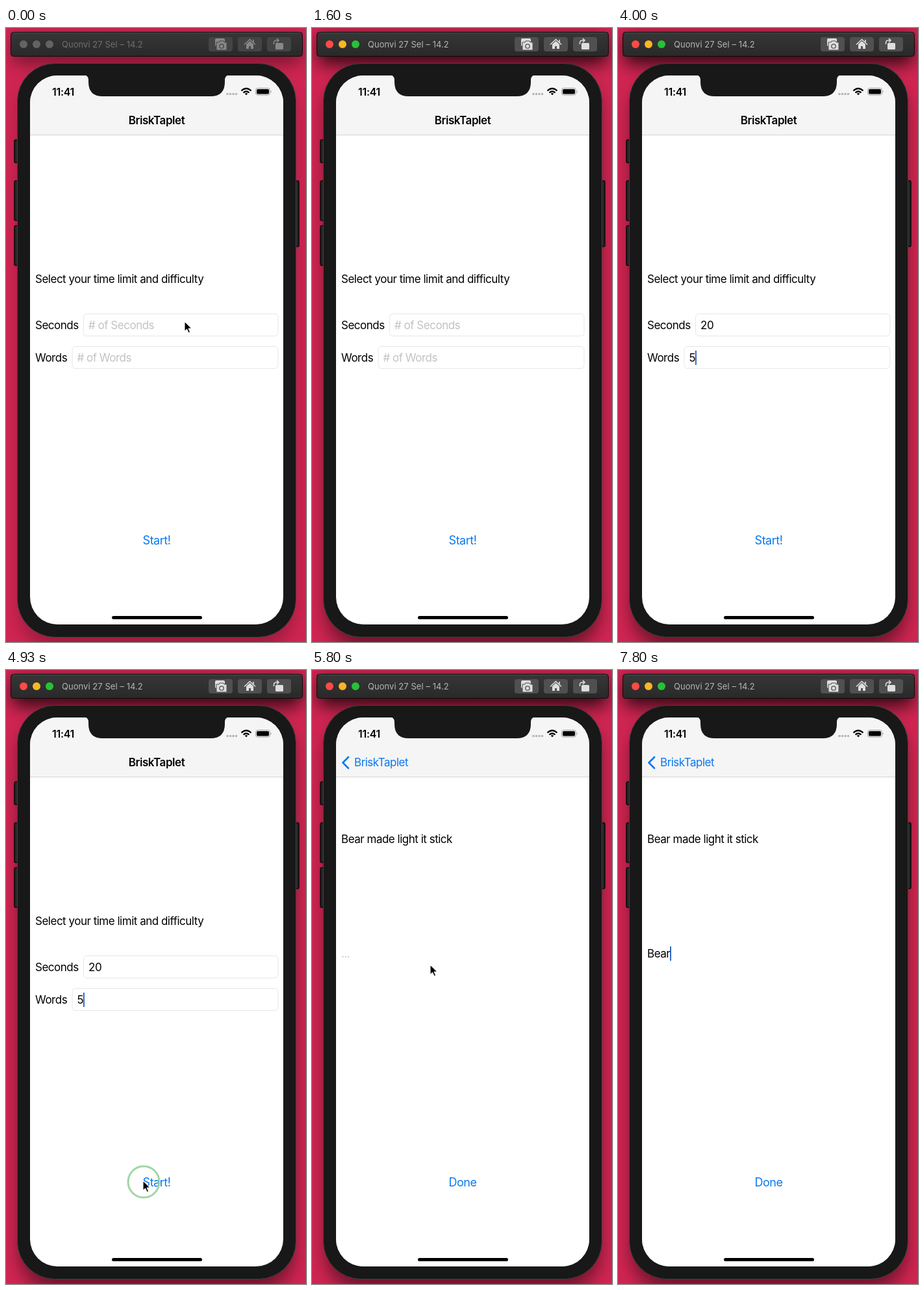
An HTML page that plays this animation: 462 by 944 pixels, repeating every 8000 ms.

```html
<!DOCTYPE html>
<html lang="en">
<head>
<meta charset="utf-8">
<title>Typing game</title>
<style>
html, body { margin: 0; width: 100%; height: 100%; overflow: hidden; background: #d02552; }
svg { display: block; width: 100vw; height: 100vh; }
text { font: 17px Inter, "Liberation Sans", sans-serif; letter-spacing: -.49px; white-space: pre; }
.bold { font-weight: 600; letter-spacing: -.45px; }
.blue { fill: #0a78f0; }
.button { font-size: 18px; text-anchor: middle; }
.hint { fill: #c2c2c4; }
.field { fill: #fff; stroke: #e6e6e6; }
.side { fill: #262626; stroke: #070707; stroke-width: 1.5; }
.icon { fill: none; stroke: currentColor; stroke-width: 1.6; }
#bar { color: #dedede; --key: #505050; --label: #b5b5b5; }
#bar.idle { color: #888; --key: #444; --label: #6f6f6f; }
#bar.idle .light { fill: #636363; }
.key { fill: var(--key); }
#device { font-size: 13px; letter-spacing: .05px; fill: var(--label); }
</style>
</head>
<body>
<svg viewBox="0 0 462 944" preserveAspectRatio="none">
  <defs>
    <linearGradient id="metal" x2="0" y2="1">
      <stop stop-color="#373737"/><stop offset="1" stop-color="#292929"/>
    </linearGradient>
    <filter id="blur" x="-20%" y="-20%" width="140%" height="140%"><feGaussianBlur stdDeviation="13"/></filter>
    <clipPath id="screen"><rect x="37" y="73" width="390" height="844" rx="42"/></clipPath>
    <clipPath id="content"><rect x="37" y="165" width="390" height="752"/></clipPath>
  </defs>

  <rect width="462" height="944" fill="#d02552"/>
  <g id="shadow" filter="url(#blur)">
    <rect x="10" y="14" width="444" height="42" rx="8"/>
    <rect x="20" y="72" width="424" height="884" rx="60" opacity=".6"/>
  </g>

  <g id="bar">
    <rect x="7.5" y="6.5" width="449" height="37" rx="4" fill="url(#metal)" stroke="#0b0b0b"/>
    <path d="M11 7.5H453" stroke="#5a5a5a" opacity=".7"/>
    <circle class="light" cx="27" cy="25" r="6" fill="#ff4b43"/>
    <circle class="light" cx="47" cy="25" r="6" fill="#fdb524"/>
    <circle class="light" cx="67" cy="25" r="6" fill="#27c138"/>
    <text id="device" x="86" y="30">Quonvi 27 Sel – 14.2</text>
    <rect class="key" x="312" y="14" width="37" height="22" rx="4"/>
    <rect class="key" x="357" y="14" width="37" height="22" rx="4"/>
    <rect class="key" x="402" y="14" width="37" height="22" rx="4"/>
    <rect x="322" y="16" width="15" height="12" rx="2" fill="currentColor"/>
    <path d="M324 22h4l1-2h6l1 2h4v12h-16z" fill="currentColor" stroke="var(--key)"/>
    <circle cx="332" cy="28" r="3.2" fill="none" stroke="var(--key)" stroke-width="1.3"/>
    <path class="icon" d="M367 25.5l8.500-8 8.500 8M381 18v4"/>
    <path d="M370 25l5.500-5 5.500 5v7h-4v-4h-3v4h-4z" fill="currentColor"/>
    <rect x="415" y="23" width="12" height="10" rx="1.500" fill="currentColor"/>
    <path class="icon" d="M412.500 25v-2q0-4 4-4h3M417 16l3 3-3 3"/>
  </g>

  <g class="side">
    <rect x="13" y="172" width="9" height="35" rx="2"/>
    <rect x="13" y="235" width="9" height="61" rx="2"/>
    <rect x="13" y="304" width="9" height="61" rx="2"/>
    <rect x="442" y="235" width="9" height="101" rx="2"/>
  </g>
  <rect x="17.500" y="54.500" width="429" height="882" rx="58" fill="#181818" stroke="#404040"/>

  <g clip-path="url(#screen)">
    <rect x="37" y="73" width="390" height="844" fill="#fff"/>
    <g clip-path="url(#content)">
      <g id="setup">
        <text x="45" y="392">Select your time limit and difficulty</text>
        <text x="45" y="463">Seconds</text>
        <rect class="field" x="119.500" y="439.500" width="299.500" height="34" rx="5"/>
        <text id="seconds" x="127" y="463"></text>
        <text x="45" y="513">Words</text>
        <rect class="field" x="102" y="489.500" width="317" height="34" rx="5"/>
        <text id="words" x="109.500" y="513"></text>
        <text class="blue button" x="232" y="794">Start!</text>
      </g>
      <rect id="dim" x="37" y="165" width="390" height="752"/>
      <g id="game">
        <rect x="37" y="165" width="390" height="752" fill="#fff"/>
        <text x="45" y="266">Bear made light it stick</text>
        <text id="entry" x="45" y="442"></text>
        <text class="blue button" x="232" y="794">Done</text>
      </g>
      <rect id="caret" width="2" height="22" fill="#3268c4"/>
    </g>

    <rect x="37" y="73" width="390" height="91" fill="#f5f5f5"/>
    <path d="M37 164.500H427" stroke="#d3d3d3"/>
    <text id="heading" class="bold" x="232" y="148" text-anchor="middle">BriskTaplet</text>
    <path id="chevron" d="M56 134l-8.500 8.500 8.500 8.500" fill="none" stroke="#0a78f0" stroke-width="2.700" stroke-linecap="round" stroke-linejoin="round"/>
    <text id="back" class="blue" y="148">BriskTaplet</text>
    <path d="M120 72q7 1 7 8v3q0 22 22 22h166q22 0 22-22v-3q0-7 7-8z" fill="#181818"/>
    <text class="bold" x="71" y="103.500" style="font-size:16px;letter-spacing:-.3px">11:41</text>
    <g fill="#b5b5b7">
      <circle cx="341" cy="101.500" r="1.800"/><circle cx="345.500" cy="101.500" r="1.800"/>
      <circle cx="350" cy="101.500" r="1.800"/><circle cx="354.500" cy="101.500" r="1.800"/>
    </g>
    <g fill="none" stroke="#000" stroke-width="2.300">
      <path d="M362.500 96.500q7.500-7 15 0M365.500 99.500q4.500-4 9 0"/>
      <path d="M367.800 101q2.200-1.800 4.400 0l-2.200 2.300z" fill="#000" stroke="none"/>
    </g>
    <rect x="384.500" y="92.500" width="22" height="10.500" rx="3" fill="none" stroke="#9b9b9b"/>
    <rect x="386" y="94" width="19" height="7.500" rx="1.700"/>
    <path d="M408 96q2 1.800 0 3.600z" fill="#9b9b9b"/>
    <rect x="163" y="904" width="139" height="5" rx="2.500"/>
  </g>

  <circle id="ring" fill="none" stroke="#9bd4a2" stroke-width="3"/>
  <path id="pointer" d="M0 0v15.500l3.600-3.400 2.500 5.700 2.600-1.100-2.500-5.600h5z" stroke="#fff" stroke-width="1.100" stroke-linejoin="round"/>
</svg>

<script>
const LOOP = 8000, PUSH = 5000, BLUE_BACK_X = 65;
const el = {};
document.querySelectorAll('[id]').forEach(node => el[node.id] = node);

const pointerPath = [
  [0, 275, 451], [870, 240, 453], [4000, 240, 453], [4200, 236, 500],
  [4600, 214, 765], [4800, 211, 785], [PUSH, 211, 785], [5270, 172, 562],
  [5440, 176, 490], [5730, 182, 453]
];
const pointerShown = [[0, 1], [1270, 0], [4000.5, 0], [4060, 1], [7330, 0]];
const clicks = [[400, 258, 452], [930, 240, 453], [4865, 212, 787], [6000, 182, 455]];
const caretFade = [
  [0, 0], [930, 0], [935, 1], [1400, 1], [1595, 0], [1735, 0], [1935, 1],
  [3335, 1], [3530, 0], [3590, 0], [3595, 1], [4130, 1], [4330, 0],
  [4500, 0], [4700, 1], [4995, 1], [5000, 0], [6130, 0], [6135, 1],
  [6760, 1], [6960, 0], [7130, 0], [7325, 1]
];
const caretOwner = [[0, 'seconds'], [3065, 'words'], [5500, 'entry']];
const fields = {
  seconds: { hint: '# of Seconds', typed: [[0, ''], [2525, '2'], [2865, '20']] },
  words: { hint: '# of Words', typed: [[0, ''], [3595, '5']] },
  entry: { hint: '...', typed: [[0, ''], [7530, 'B'], [7595, 'Be'], [7665, 'Bea'], [7790, 'Bear']] }
};

const hold = (table, t) => table.filter(row => row[0] <= t).pop()[1];

function blend(table, t) {
  const next = table.findIndex(row => row[0] > t);
  if (next < 0) return table[table.length - 1].slice(1);
  const a = table[next - 1], b = table[next];
  const k = (t - a[0]) / (b[0] - a[0]);
  return a.slice(1).map((v, i) => v + (b[i + 1] - v) * k);
}

function set(node, attrs) {
  for (const name in attrs) node.setAttribute(name, attrs[name]);
}

const shift = x => `translate(${x} 0)`;

function drawFields(t) {
  for (const id in fields) {
    const typed = hold(fields[id].typed, t);
    el[id].textContent = typed || fields[id].hint;
    el[id].classList.toggle('hint', !typed);
  }
  const id = hold(caretOwner, t), node = el[id];
  const width = hold(fields[id].typed, t) ? node.getComputedTextLength() : 0;
  set(el.caret, {
    x: +node.getAttribute('x') + width - .2,
    y: node.getAttribute('y') - 17,
    opacity: blend(caretFade, t)[0]
  });
}

// Critically damped spring for the page transition
function drawPush(t) {
  const s = Math.max(0, t - PUSH) * .0177;
  const rest = t > 5730 ? 0 : (1 + s) * Math.exp(-s), done = 1 - rest;
  set(el.setup, { transform: shift(-117 * done) });
  set(el.game, { transform: shift(390 * rest) });
  set(el.dim, { opacity: .115 * done });
  set(el.heading, { x: 232 - 120 * done, opacity: Math.max(0, 1 - 1.6 * done) });
  set(el.back, { x: BLUE_BACK_X + 87 * rest, opacity: Math.max(0, 1.6 * done - .6) / (1 - 0) });
  set(el.chevron, { opacity: done });
}

function drawPointer(t) {
  const [x, y] = blend(pointerPath, t);
  set(el.pointer, { transform: `translate(${x} ${y})`, opacity: hold(pointerShown, t) });
  const click = clicks.find(c => t >= c[0] && t < c[0] + 270);
  if (!click) return set(el.ring, { opacity: 0 });
  const age = t - click[0];
  set(el.ring, {
    cx: click[1], cy: click[2],
    r: 16 + 8 * Math.min(1, age / 60),
    opacity: .95 * Math.min(1, (270 - age) / 170)
  });
}

function draw() {
  const t = performance.now() % LOOP, idle = t < 470;
  el.bar.classList.toggle('idle', idle);
  set(el.shadow, { opacity: idle ? .4 : .75 });
  drawFields(t);
  drawPush(t);
  drawPointer(t);
  requestAnimationFrame(draw);
}
draw();
</script>
</body>
</html>
```
